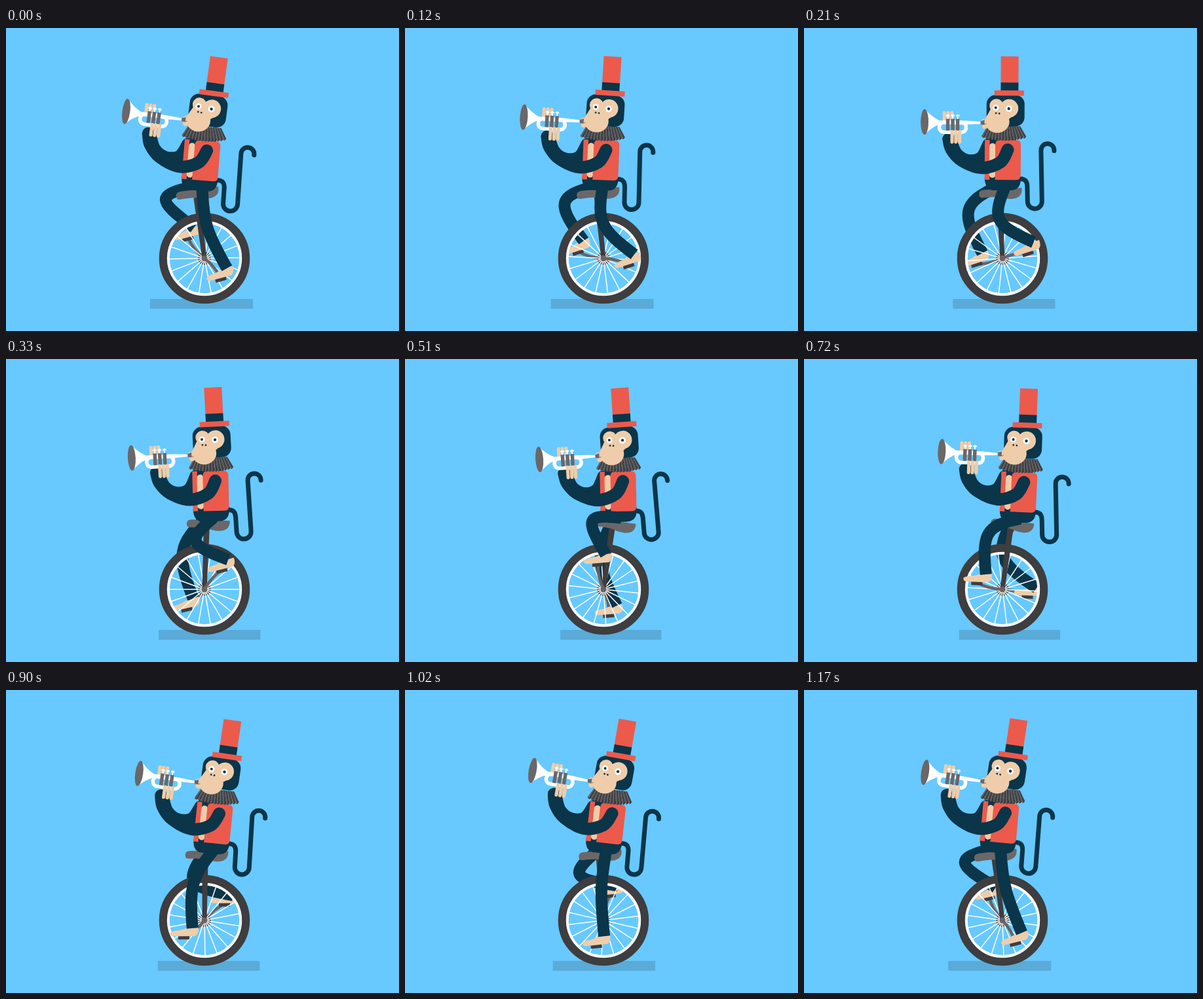
An HTML page for the animation above (1200 ms loop, 600x463 px).

```html
<!DOCTYPE html>
<html lang="en">
<head>
<meta charset="utf-8">
<title>Monkey on a unicycle</title>
<style>
html, body { margin: 0; width: 100%; height: 100%; overflow: hidden; background: #67c9ff; }
svg { display: block; width: 100vw; height: 100vh; }
.navy { fill: #0b3549; }
.red { fill: #ec5a4c; }
.skin { fill: #efcdaa; }
.dark { fill: #3e3d3f; }
.grey { fill: #6b6768; }
.white { fill: #fff; }
.limb { fill: none; stroke: #0b3549; stroke-width: 18; }
.round { stroke-linecap: round; }
.crank { fill: none; stroke: #686465; stroke-width: 4.5; stroke-linecap: round; }
</style>
</head>
<body>
<svg viewBox="0 0 600 463" preserveAspectRatio="none">
  <rect width="600" height="463" fill="#67c9ff"/>
  <rect id="shadow" y="414" height="15" fill="#5aabd8"/>

  <path id="tail" class="limb round" style="stroke-width:7"
    d="M-34 -46H-22C-13 -46 -11 -41 -11 -34V-11A11 11 0 0 0 11 -11V-89A10 10 0 0 1 31 -89V-88"/>

  <path id="crankB" class="crank" d="M0 0Q22 -5 40 0"/>
  <g id="footB"></g>
  <path id="legB" class="limb"/>

  <g transform="translate(303 352)">
    <circle r="63" fill="none" stroke="#3e3d3f" stroke-width="12.5"/>
    <circle r="55.2" fill="none" stroke="#fff" stroke-width="4"/>
    <circle r="10" class="dark"/>
    <g id="spokes" stroke="#fff" stroke-width="1.5"></g>
  </g>

  <g id="post">
    <path class="dark" d="M-4.5 -94H4.5L3.5 0H-3.5Z"/>
    <path class="grey" d="M-30 -96Q-33 -106 -22 -106H35Q36 -91 20 -90Q10 -90 2 -93Q-4 -95 -25 -94Q-29 -94 -30 -96Z"/>
  </g>

  <path id="crankF" class="crank" d="M0 0Q22 -5 40 0"/>
  <circle cx="303" cy="352" r="4.5" fill="#686465"/>
  <path id="armB" class="limb round"/>

  <g id="body">
    <path class="navy" d="M283 166H324V226H331Q333 248 315 248H288Q276 246 276 228H283Z"/>
    <path class="red" d="M276 171H283.5V232H276Z"/>
    <rect class="skin" x="283" y="176" width="10" height="53" rx="5"/>
    <path class="red" d="M292 179Q292 171 299 171H324Q331 171 331 178V225Q331 232 324 232H292Z"/>
  </g>

  <g id="footF"></g>
  <path id="legF" class="limb"/>
  <path id="armF" class="limb round" style="stroke-width:19"/>
  <g id="collar"></g>

  <g id="head">
    <rect class="navy" x="278" y="102" width="58" height="48" rx="14"/>
    <g class="skin">
      <circle cx="293" cy="118.500" r="10.500"/>
      <circle cx="312.500" cy="122.500" r="14"/>
      <path d="M284 124L300 117L316 136L303 146L274 143Z"/>
      <ellipse cx="294.500" cy="143" rx="18.500" ry="17"/>
      <circle cx="274" cy="143.500" r="4.500"/>
      <circle cx="275.500" cy="150" r="4"/>
    </g>
    <path d="M271 147.500L278 146.500" stroke="#8f7865" stroke-width="1"/>
    <g class="white">
      <circle cx="292" cy="121.500" r="4.600"/>
      <circle cx="312" cy="123" r="5"/>
    </g>
    <g class="navy">
      <circle cx="292" cy="121.500" r="2"/>
      <circle cx="312" cy="123" r="2.200"/>
      <circle cx="292.500" cy="130" r="1.400"/>
      <circle cx="297.500" cy="130.500" r="1.400"/>
    </g>
    <rect class="red" x="299.500" y="43" width="27" height="41"/>
    <rect class="navy" x="299.500" y="83" width="27" height="13"/>
    <rect class="red" x="290" y="95" width="45" height="8"/>

    <g id="fingersTop" class="skin"></g>
    <path class="white" d="M184 124.500Q194 136 206 141.500H245L270 143V146.500L245 147.500H206Q194 152 184 163.500Z"/>
    <rect x="206" y="144.500" width="41" height="15" rx="7" fill="none" stroke="#fff" stroke-width="5.500"/>
    <path class="grey" d="M269 142.500L275 140.500V148L269 147Z"/>
    <ellipse class="grey" cx="183.500" cy="144" rx="6" ry="19.500"/>
    <g id="valves"></g>
    <g id="fingersLow" class="skin"></g>
  </g>
</svg>
<script>
const LOOP = 1200, STEP = 30, HUB = [303, 352], CRANK = 40;
const HIP = [303.5, 232], BRIM = [312.5, 99], ANKLE = [13, -13];
const RAD = Math.PI / 180;
const $ = id => document.getElementById(id);

// Swing around mid, at its highest when the cycle angle is peak
const wave = (deg, mid, amp, peak) => mid + amp * Math.cos((deg - peak) * RAD);

function turn([x, y], deg) {
  const c = Math.cos(deg * RAD), s = Math.sin(deg * RAD);
  return [x * c - y * s, x * s + y * c];
}
const add = (a, b) => [a[0] + b[0], a[1] + b[1]];
const sub = (a, b) => [a[0] - b[0], a[1] - b[1]];
const mix = (a, b, k) => [a[0] + (b[0] - a[0]) * k, a[1] + (b[1] - a[1]) * k];
const moved = (p, [x, y, r], o) => add(turn(sub(p, o), r), [x, y]);

function place(id, [x, y, r], o = [0, 0]) {
  $(id).setAttribute('transform', `translate(${x} ${y}) rotate(${r}) translate(${-o[0]} ${-o[1]})`);
}

// Smooth curve through points
function curve(id, p) {
  let d = `M${p[0]}`;
  for (let i = 0; i < p.length - 1; i++) {
    const a = p[i - 1] || p[i], b = p[i], c = p[i + 1], e = p[i + 2] || c;
    d += `C${add(b, mix([0, 0], sub(c, a), 1 / 6))} ${sub(c, mix([0, 0], sub(e, b), 1 / 6))} ${c}`;
  }
  $(id).setAttribute('d', d);
}

function build() {
  const foot = '<rect class="dark" x="-9" y="-2" width="17" height="6"/>' +
    '<path class="skin" d="M3 -13L22 -14Q23 -4 17 -1H-17Q-22 -2 -21 -7Q-16 -10 -7 -10Z"/>';
  $('footF').innerHTML = $('footB').innerHTML = foot;

  let s = '';
  for (let i = 0; i < 18; i++) s += `<path d="M0 0H54" transform="rotate(${i * 20})"/>`;
  $('spokes').innerHTML = s;

  const finger = (x, y, h) => `<rect x="${x}" y="${y}" width="5.200" height="${h}" rx="2.500"/>`;
  let top = '', low = '', valves = '';
  for (let i = 0; i < 3; i++) {
    const x = 219 + i * 7.5;
    top += finger(211 + i * 5.8, 127, 16);
    low += finger(223 + i * 5.8, 156, 21);
    valves += `<path d="M${x} 132V141M${x - 2.8} 134H${x + 2.8}" stroke="#fff" stroke-width="2"/>` +
      `<rect class="grey" x="${x - 2.7}" y="139" width="5.400" height="18"/>`;
  }
  $('fingersTop').innerHTML = top;
  $('fingersLow').innerHTML = low;
  $('valves').innerHTML = valves;

  let pleats = '';
  const N = 14;
  for (let i = 0; i < N; i++) {
    const edge = (k, w) => 305 + w * (2 * k / N - 1);
    const drop = k => 170.5 - 5 * (2 * k / N - 1) ** 2;
    const strip = (cls, a, b) => `<path class="${cls}" d="M${edge(a, 25)} 150L${edge(a, 34)} ${drop(a)}` +
      `Q${edge((a + b) / 2, 34)} ${drop(i) + 4} ${edge(b, 34)} ${drop(b)}L${edge(b, 25)} 150Z"/>`;
    pleats += strip('dark', i, i + 1) + strip('grey', i + 0.1, i + 0.45);
  }
  $('collar').innerHTML = pleats;
}

// Two bones from hip to ankle, knee forward, drawn as one soft bend
function leg(side, angle, tilt, hip, thigh, shin) {
  const pedal = add(HUB, turn([CRANK, 0], angle));
  const ankle = add(pedal, turn(ANKLE, tilt));
  const [dx, dy] = sub(ankle, hip), d = Math.hypot(dx, dy);
  const along = (thigh ** 2 - shin ** 2 + d * d) / (2 * d);
  const out = Math.sqrt(Math.max(0, thigh ** 2 - along ** 2));
  const knee = add(hip, [(dx * along - dy * out) / d, (dy * along + dx * out) / d]);
  place('crank' + side, [...HUB, angle]);
  place('foot' + side, [...pedal, tilt]);
  $('leg' + side).setAttribute('d', `M${hip}C${mix(hip, knee, 0.88)} ${mix(ankle, knee, 0.88)} ${ankle}`);
}

function draw(t) {
  const deg = 360 * t / LOOP;
  const body = [wave(deg, 312, 16.6, 185), wave(deg, 233, 1, 250), wave(deg, 2.4, 4.1, -57)];
  const head = [wave(deg, 327, 14.2, 227), wave(deg, 100.4, 1.1, 255), wave(deg, 2.9, 7.15, -48)];
  const joint = (x, y, k) => mix(moved([x, y], body, HIP), moved([x, y], head, BRIM), k);

  $('shadow').setAttribute('x', wave(deg, 230.3, 8.7, 180) + wave(2 * deg, 0, 1.6, 180));
  $('shadow').setAttribute('width', wave(deg, 155.5, 1.5, 0));
  $('spokes').setAttribute('transform', `rotate(${-deg - 1})`);
  place('tail', [wave(deg, 360.3, 18.5, 178), wave(deg, 278.6, 3.6, -70), wave(deg, 0.1, 5, -40)]);
  place('post', [...HUB, wave(deg, 0.75, 8.2, 180)]);
  place('body', body, HIP);
  place('collar', body, HIP);
  place('head', head, BRIM);

  const tilt = wave(deg, -8, 10, 225);
  leg('B', 231 - deg, tilt, add(body, [-6, 9]), 70, 82);
  leg('F', 51 - deg, tilt, add(body, [4, 10]), 61, 73);

  curve('armB', [joint(281, 178, 0), joint(270, 198, 0.1), joint(250, 202, 0.3),
    joint(233, 192, 0.4), joint(224, 172, 0.5)]);
  curve('armF', [joint(311, 186, 0), joint(300, 205, 0), joint(272, 214, 0.1),
    joint(241, 203, 0.3), joint(225, 186, 0.4), joint(220.5, 170, 0.5)]);
}

function tick() {
  const t = performance.now() % LOOP;
  draw(Math.floor(t / STEP + 1e-6) * STEP % LOOP);
  requestAnimationFrame(tick);
}

build();
tick();
</script>
</body>
</html>
```
